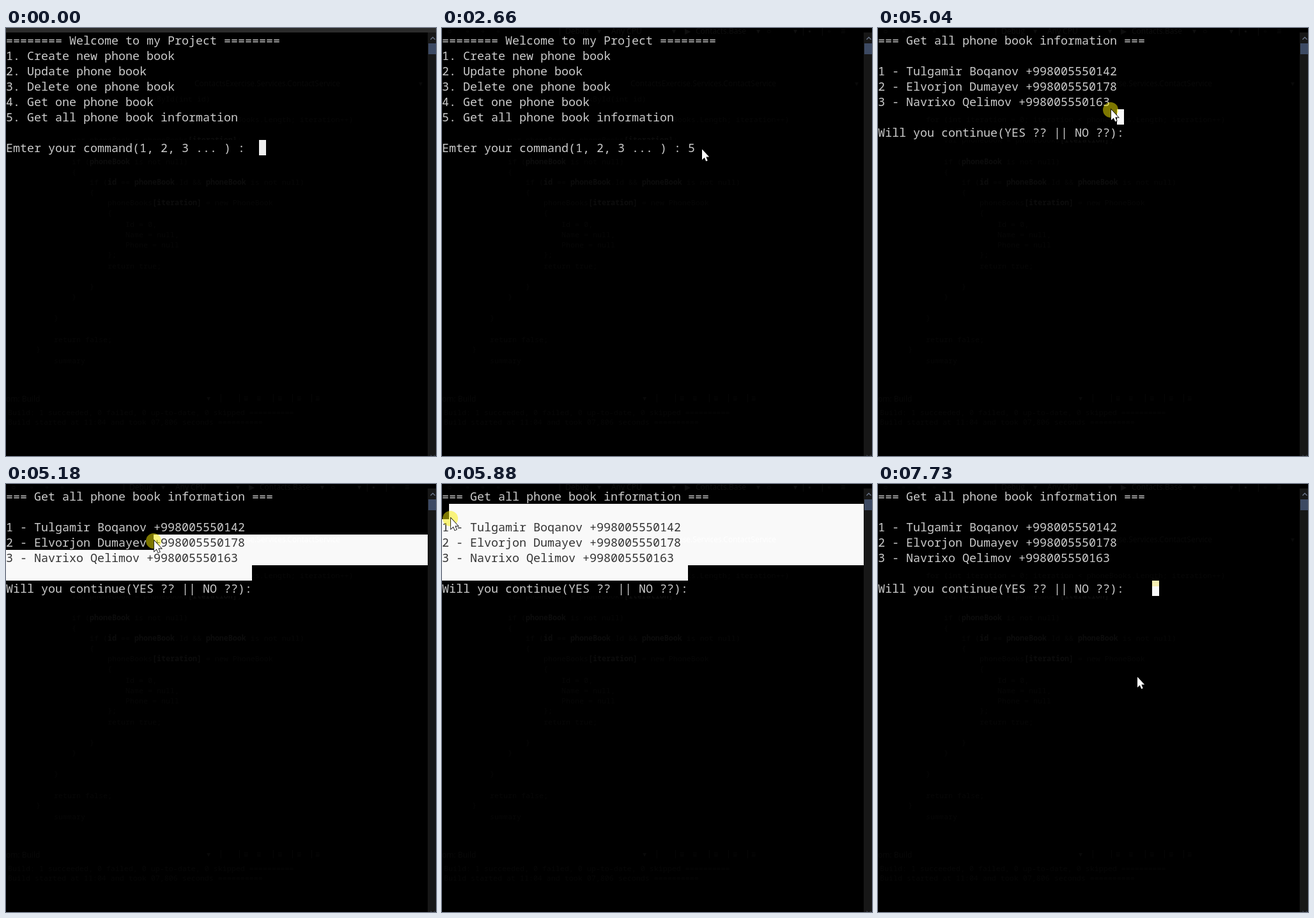
These frames come from a looping animation (673x669 px, 8000 ms). An HTML page:

```html
<!DOCTYPE html>
<html lang="en">
<head>
<meta charset="utf-8">
<title>Console phone book</title>
<style>
  html, body { margin: 0; width: 100%; height: 100%; overflow: hidden; background: #000; }
  #stage { position: relative; width: 673px; height: 669px; overflow: hidden; background: #000; }
  #stage div, #stage svg { position: absolute; }
  .mono { font-family: "Noto Sans Mono", "DejaVu Sans Mono", monospace; white-space: pre; }
  .ghost { font-size: 11.667px; line-height: 16px; color: #070707; }
  .ghost b { font-weight: 600; color: #0c0c0c; }
  .ui { font: 12px/16px "Open Sans", "Noto Sans", sans-serif; white-space: pre; color: #090909; }
  .page { inset: 0; font-size: 18.3333px; font-weight: 500; line-height: 24px; color: #ccc; --paper: #000; }
  .page .line { left: 0; height: 24px; background: var(--paper); }
  #marked { color: #333; --paper: #f9f9f9; background: var(--paper); }
  #marked .ui { color: #fff; }
  #tint { left: 429px; top: 151px; width: 11px; height: 9px; background: #f5efb4; }
  #bar { left: 0; top: 0; width: 673px; height: 7px; background: #2b2b2b; }
  #tools { left: 0; top: 0; width: 673px; height: 12px; overflow: hidden; }
  #tools .ui { color: #0e0e0e; }
  #scroll { left: 660px; top: 7px; width: 13px; height: 662px; background: #171717; }
  #thumb { left: 1px; top: 17px; width: 12px; height: 17px; background: #3d4a63; }
  #caret { width: 11px; height: 6px; background: #fff; }
  #click { left: -13px; top: -12px; width: 24px; height: 24px; border-radius: 50%; background: rgba(250, 238, 0, .5); }
  #mouse { left: 0; top: 0; }
  #mouse svg { left: 0; top: 0; overflow: visible; }
</style>
</head>
<body>
<div id="stage">
  <div id="code"></div>
  <div id="plain" class="page mono"></div>
  <div id="marked" class="page mono"><div class="text"></div><div id="tint"></div></div>
  <div id="tools"></div>
  <div id="bar"></div>
  <div id="scroll">
    <svg width="13" height="17"><path d="M4.5 11L8 7.5L11.5 11" fill="none" stroke="#6a7488" stroke-width="1.4"/></svg>
    <div id="thumb"></div>
    <svg width="13" height="10" style="top:652px"><path d="M4.5 8.5L8 12L11.5 8.5" fill="none" stroke="#3a3f4a" stroke-width="1.2"/></svg>
  </div>
  <div id="caret"></div>
  <div id="mouse">
    <div id="click"></div>
    <svg width="12" height="19"><path d="M0 -.5V16L3.8 12.6L6.2 18.3L8.7 17.2L6.3 11.6H11.2Z" fill="#fff" stroke="#000" stroke-width="1.6" paint-order="stroke"/></svg>
  </div>
</div>
<script>
const LOOP = 8000, CW = 11, CH = 24, TOP = 7, RIGHT = 660;
const $ = id => document.getElementById(id);

const menu = `======== Welcome to my Project ========
1. Create new phone book
2. Update phone book
3. Delete one phone book
4. Get one phone book
5. Get all phone book information

Emter your command(1, 2, 3 ... ) : `;
const list = `=== Get all phone book information ===

1 - Tulgamir Boqanov +998005550142
2 - Elvorjon Dumayev +998005550178
3 - Navrixo Qelimov +998005550163

Will you continue(YES ?? || NO ??): `;

function put(parent, cls, x, y, html) {
  const el = document.createElement('div');
  el.className = cls;
  el.style.left = x + 'px';
  el.style.top = y + 'px';
  el.innerHTML = html;
  parent.append(el);
  return el;
}

// Editor window shining faintly through the console: indent level, middle, text
const book = '<b>phoneBook</b>', item = '<b>[iteration]</b>';
[
  [0, 111, 'public bool DeletePhoneBookById(int id)'],
  [1, 143, 'for (int iteration = 0; iteration &lt; phoneBooks.Length; iteration++)'],
  [2, 175, `var phoneBook = phoneBooks${item};`],
  [2, 209, `if (${book} is not null)`],
  [2, 225, '{'],
  [3, 241, `if (<b>id</b> == ${book}.Id &amp;&amp; ${book} is not null)`],
  [3, 257, '{'],
  [4, 273, `phoneBooks${item} = new PhoneBook`],
  [4, 289, '{'],
  [5, 307, 'Id = 0,'],
  [5, 323, 'Name = null,'],
  [5, 339, 'Phone = null'],
  [4, 354, '};'],
  [4, 372, 'return true;'],
  [3, 404, '}'],
  [2, 420, '}'],
  [1, 453, '}'],
  [1, 487, 'return false;'],
  [0, 502, '}'],
  [1, 520, 'summary'],
].forEach(([level, y, html]) => put($('code'), 'ghost mono', 47 + 28 * level, y - 8, html));

put($('code'), 'ghost mono', 3, 593, 'Build: 1 succeeded, 0 failed, 0 up-to-date, 0 skipped ==========');
put($('code'), 'ghost mono', 3, 608, 'Build started at 11:04 and took 07,806 seconds ==========');
put($('code'), 'ui', 0, 572, 'om: Build');
put($('code'), 'ui', 314, 571, '▾');
[333, 362, 415, 445, 475].forEach(x => put($('code'), 'ui', x, 570, '|'));
[372, 392, 425, 455, 484].forEach(x => put($('code'), 'ui', x, 571, '≡'));
put($('code'), 'ui', 646, 79, '▾');
for (const layer of [$('code'), $('marked').firstElementChild])
  put(layer, 'ui', 295, 79, 'ContactsExercise.Services.ContactService');

[[8, '○'], [38, '▫'], [62, '▫'], [86, '▫'], [181, '|'], [193, 'Debug'], [243, '▾'], [265, 'Any CPU'],
 [360, '▾'], [380, '▶'], [397, 'Contacts.Base'], [492, '▾'], [508, '○'], [550, '▾'], [562, '|'],
 [573, '▪'], [592, '|'], [604, '▫'], [624, '≡']
].forEach(([x, s]) => put($('tools'), 'ui', x, -3, s));

let shown;
function show(text) {
  if (text === shown) return;
  shown = text;
  for (const page of [$('plain'), $('marked')]) {
    page.querySelectorAll('.line').forEach(el => el.remove());
    text.split('\n').forEach((s, i) => {
      if (s) put(page, 'line', 0, TOP + CH * i, '').textContent = s;
    });
  }
}

// Pointer legs: first step, last step, number of steps, end point, optional bend
const legs = [
  [130, 530, 7, 440, 198],
  [790, 1190, 5, 407, 190],
  [3730, 4500, 12, 411, 142, 443, 170],
  [4570, 4570, 1, 411, 141],
  [4830, 4900, 2, 380, 137],
  [4970, 5040, 2, 365, 128],
  [5110, 5320, 4, 99, 50],
  [5390, 5600, 4, 24, 46],
  [5670, 6030, 6, 3, 62],
  [6290, 6910, 10, 435, 173, 300, 222],
  [7240, 7730, 8, 406, 302],
];

function pointer(t) {
  let x = 600, y = 612;
  for (const [from, to, n, ex, ey, bx = (x + ex) / 2, by = (y + ey) / 2] of legs) {
    if (t < from) break;
    const gap = (to - from) / (n - 1) || 1;
    const p = Math.min(n, Math.floor((t - from) / gap + 1e-6) + 1) / n;
    const u = p * p * (3 - 2 * p), v = 1 - u;
    x = v * v * x + 2 * u * v * bx + u * u * ex;
    y = v * v * y + 2 * u * v * by + u * u * ey;
  }
  return [x, y];
}

// Outline of the marked cells from one cell to another, in reading order
function cells(c0, r0, c1 = c0, r1 = r0) {
  const x0 = c0 * CW, x1 = (c1 + 1) * CW, y0 = TOP + r0 * CH, y1 = TOP + r1 * CH;
  const pts = r0 === r1
    ? [[x0, y0], [x1, y0], [x1, y0 + CH], [x0, y0 + CH]]
    : [[x0, y0], [RIGHT, y0], [RIGHT, y1], [x1, y1], [x1, y1 + CH], [0, y1 + CH], [0, y0 + CH], [x0, y0 + CH]];
  return `polygon(${pts.map(([x, y]) => `${x}px ${y}px`).join()})`;
}

function marked(t, x, y) {
  if (t < 2200) return cells(36, 7);
  if (t < 2530) return cells(37, 7);
  if (t < 4900) return '';
  if (t < 5110) return cells(34, 5);
  if (t >= 6970) return cells(39, 6);
  if (t >= 6030) return cells(0, 2, 34, 5);
  return cells(Math.floor(x / CW), Math.floor((y - TOP) / CH), 34, 5);
}

const within = (t, spans) => spans.some(([a, b]) => t >= a && t < b);
const see = (id, on) => { $(id).style.visibility = on ? 'visible' : 'hidden'; };
const move = (id, x, y) => { $(id).style.transform = `translate(${x}px, ${y}px)`; };

function draw(t) {
  const [x, y] = pointer(t);
  show(t < 2660 ? menu : t < 3130 ? menu + '5' : list);

  const clip = marked(t, x, y);
  see('marked', clip);
  $('marked').style.clipPath = clip || 'none';

  const active = t >= 860;
  see('bar', !active);
  see('tools', active);
  $('marked').style.setProperty('--paper', active ? '#f9f9f9' : '#efefef');

  see('caret', within(t, [[1590, 2130], [3060, 3730], [4270, 4830], [6700, 7240]]));
  if (t < 3060) move('caret', 385, 193);
  else if (t < 3130) move('caret', 0, 217);
  else move('caret', 396, 169);

  see('mouse', t >= 130);
  see('click', within(t, [[2130, 2330], [4900, 6290], [6970, 7040]]));
  move('mouse', Math.round(x), Math.round(y));
}

const start = performance.now();
function tick() {
  draw((performance.now() - start) % LOOP);
  requestAnimationFrame(tick);
}
tick();
</script>
</body>
</html>
```
